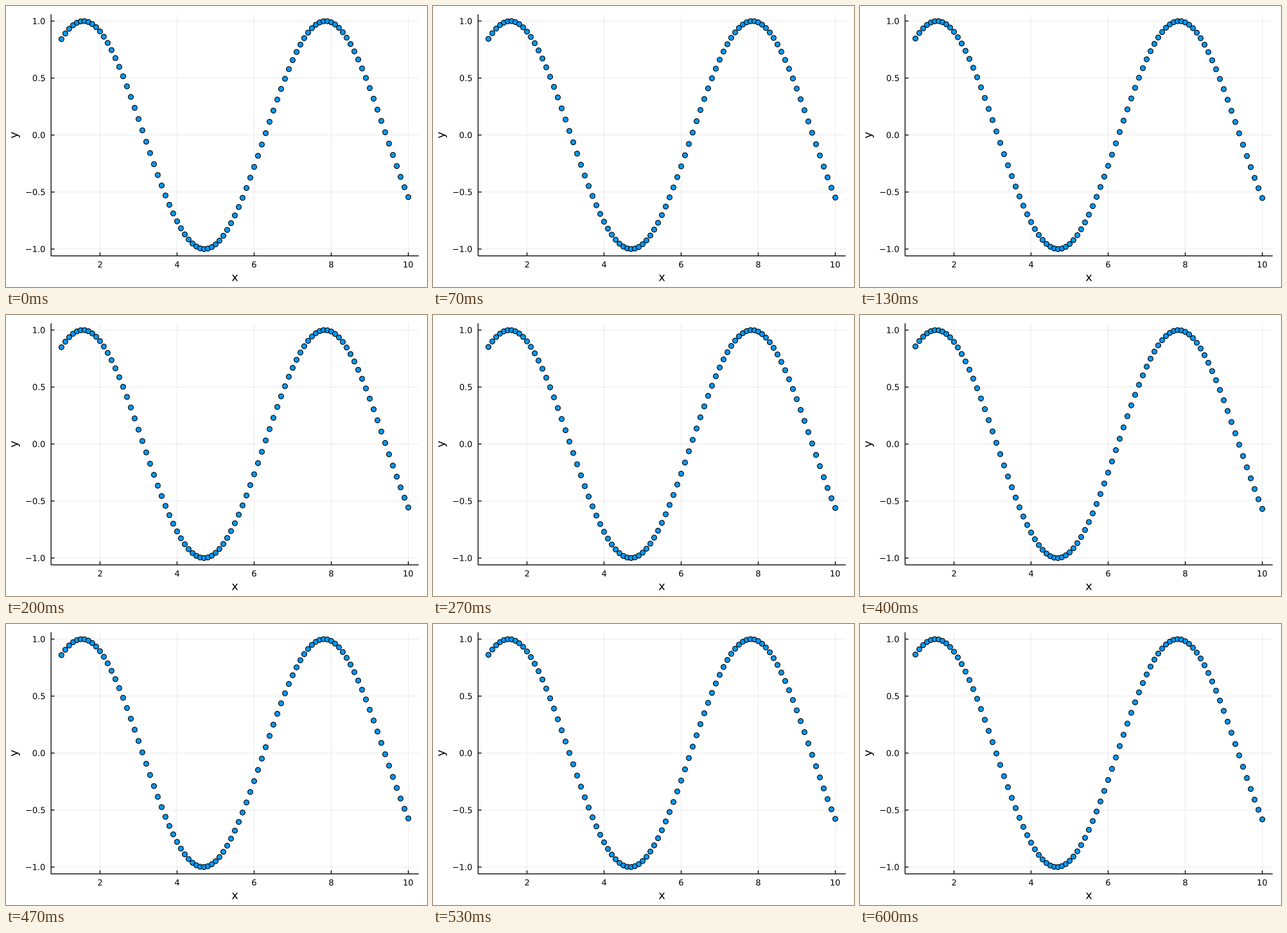
A matplotlib script that plays this animation: 600 px wide and 400 px high, repeating every 670 ms.

```python
import numpy as np
import matplotlib.pyplot as plt
from matplotlib.animation import FuncAnimation
from matplotlib.patches import Circle, PathPatch
from matplotlib.textpath import TextPath
from matplotlib.transforms import Affine2D

W, H, DPI = 600, 400, 100
PX = 72 / DPI                      # one pixel in points
LEFT, RIGHT, TOP, BOTTOM = 64.2, 588.19, 11.81, 355.7
TICK = 5
PAD = 0.03                         # widening of the data range on each side
STEPS, PHASE = 10, 0.005
TICK_EM, LABEL_EM = 11.85, 16.3

fig = plt.figure(figsize=(W / DPI, H / DPI), dpi=DPI, facecolor="white")
ax = fig.add_axes([0, 0, 1, 1])
ax.set(xlim=(0, W), ylim=(H, 0))
ax.axis("off")


def to_pixels(v, lo, hi, start, end):
    pad = PAD * (hi - lo)
    return start + (v - lo + pad) / (hi - lo + 2 * pad) * (end - start)


def line(xs, ys, **style):
    item, = ax.plot(xs, ys, **{"color": "black", "lw": 1.2 * PX,
                               "solid_capstyle": "butt", **style})
    item.set_snap(False)
    return item


def grid_line(xs, ys):
    return line(xs, ys, lw=0.7 * PX, alpha=0.1, zorder=1)


def place(glyphs, x, y):
    glyphs.set_transform(Affine2D().translate(x, y) + ax.transData)


def label(text, x, y, em, align="center", angle=0):
    """Text as outlines, so that it can sit between whole pixels."""
    path = TextPath((0, 0), text, size=em, prop={"family": "DejaVu Sans"})
    box = path.get_extents()
    shift = box.x1 if align == "right" else (box.x0 + box.x1) / 2
    flip = Affine2D().translate(-shift, 0).scale(1, -1).rotate_deg(-angle)
    glyphs = PathPatch(path.transformed(flip), fc="black", lw=0, snap=False)
    ax.add_patch(glyphs)
    place(glyphs, x, y)
    return glyphs


x = np.linspace(1, 10, 91)
px = to_pixels(x, 1, 10, LEFT, RIGHT)

for v in range(2, 11, 2):
    tx = to_pixels(v, 1, 10, LEFT, RIGHT)
    grid_line([tx, tx], [TOP, BOTTOM])
    line([tx, tx], [BOTTOM, BOTTOM - TICK])
    label(str(v), tx, 372.2, TICK_EM)

y_ticks = []
for v in np.linspace(-1, 1, 5):
    text = f"{v:.1f}".replace("-", "\u2212")
    y_ticks.append((v, grid_line([LEFT, RIGHT], [0, 0]),
                    line([LEFT, LEFT + TICK], [0, 0]),
                    label(text, 55.3, 0, TICK_EM, "right")))

line([LEFT, RIGHT], [BOTTOM, BOTTOM])
line([LEFT, LEFT], [TOP, BOTTOM])
label("x", (LEFT + RIGHT) / 2, 391.5, LABEL_EM)
label("y", 16.5, (TOP + BOTTOM) / 2, LABEL_EM, angle=90)

dots = [Circle((cx, 0), 3.6, fc="#009afa", ec="black", lw=PX, zorder=3)
        for cx in px]
for dot in dots:
    ax.add_patch(dot)


def draw(tick):
    step = (2 * tick + 1) * 3 // 40    # 15 steps a second on a 10 ms clock
    y = np.sin(x + PHASE * step)
    lo, hi = y.min(), y.max()
    for dot, cx, cy in zip(dots, px, to_pixels(y, lo, hi, BOTTOM, TOP)):
        dot.center = cx, cy
    for v, grid, mark, text in y_ticks:
        ty = to_pixels(v, lo, hi, BOTTOM, TOP)
        grid.set_ydata([ty, ty])
        mark.set_ydata([ty, ty])
        place(text, 55.3, ty + 4.3)
    return dots


anim = FuncAnimation(fig, draw, frames=67, interval=10, repeat=True,
                     repeat_delay=0, blit=False)
plt.show()
```
